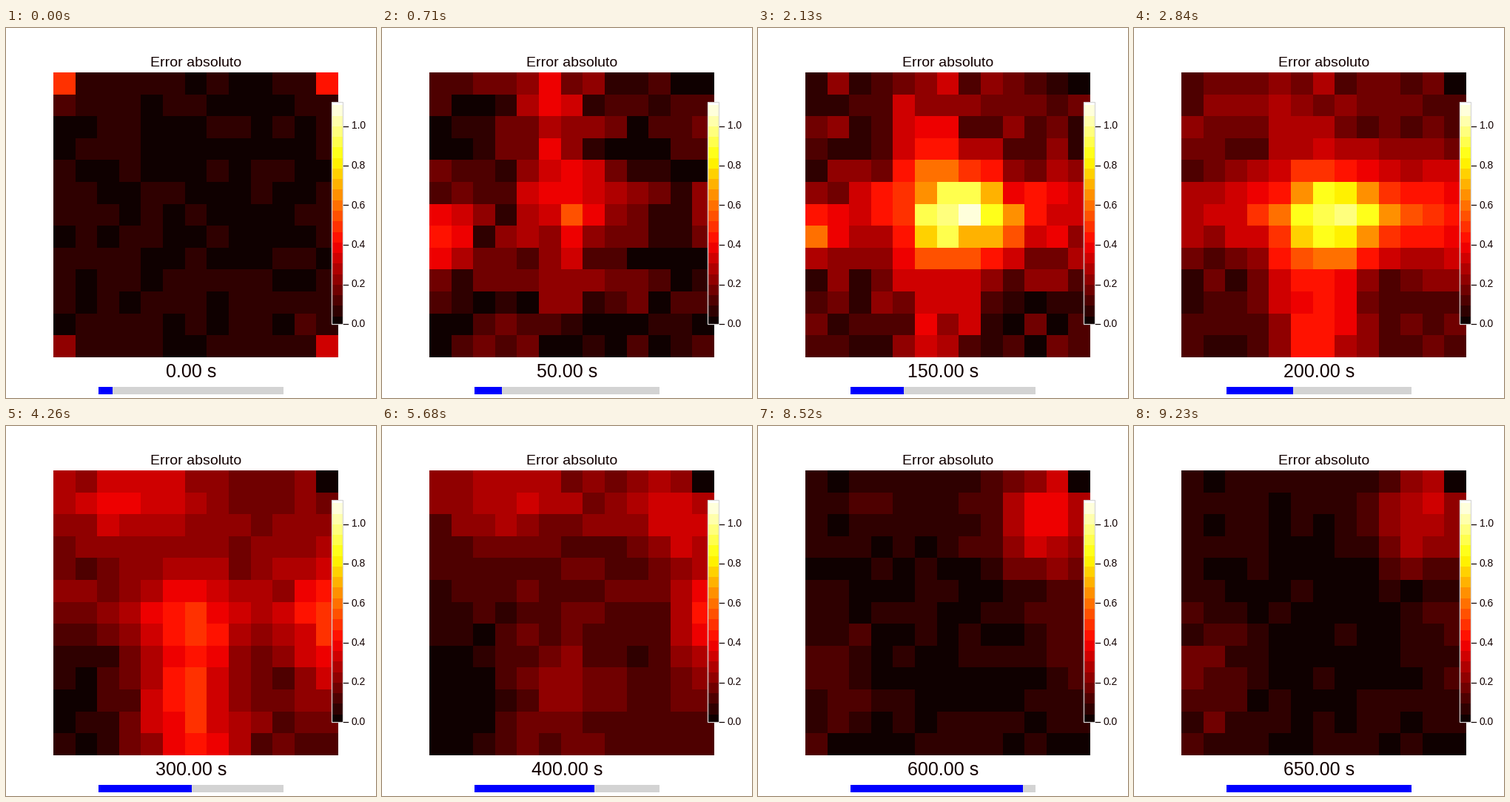
These frames come from a looping animation (500x500 px, 9940 ms). A matplotlib script:

```python
import numpy as np
import matplotlib.pyplot as plt
from matplotlib.animation import FuncAnimation
from matplotlib.colors import ListedColormap
from matplotlib.patches import Rectangle

plt.rcParams["font.family"] = "Liberation Sans"

N = 13            # cells per side
FRAMES = 14
DT = 50           # simulated seconds per frame
STEP = 0.0535     # width of one colour level
LEVELS = 22
TOP = 1.1215      # value at the top of the colour bar
INK = "#120000"

row, col = np.mgrid[:N, :N]
phase = np.random.default_rng(12).uniform(0, 2 * np.pi, (N, N))


def bell(x, mid, width):
    return np.exp(-((x - mid) / width) ** 2 / 2)


def bump(r, c, height, width):
    return height * bell(row, r, width[0]) * bell(col, c, width[1])


def field(t):
    """Absolute error: sources that swell and fade, over a drifting noise."""
    start = bell(t, 0, 0.3)
    heat = (
        bump(5.9, 6.9, 0.55, (1.5, 1.8)) * bell(t, 3, 1.5)       # core
        + bump(6.9, 0, 0.55, (1.2, 1.1)) * bell(t, 2, 1)         # west
        + bump(5.9, 6, 0.28, (1.2, 6)) * bell(t, 4, 1.5)         # band
        + bump(2, 5.2, 0.38, (4, 1.1)) * bell(t, 1.8, 1)         # upper column
        + bump(10, 5.7, 0.40, (3.5, 1.4)) * bell(t, 5, 1.8)      # lower column
        + bump(0.8, 3.2, 0.22, (1.4, 2.8)) * bell(t, 7, 2.5)     # north
        + bump(6.3, 12, 0.30, (2.2, 1.1)) * bell(t, 7, 3.2)      # east
        + bump(1.5, 10.5, 0.42, (1.6, 1.6)) * bell(t, 11, 2.7)   # north-east
        - bump(10, 0.7, 0.18, (2.6, 1.4)) * bell(t, 7.5, 1.8)    # cool corner
        + bump(9, 0.5, 0.14, (2, 1.5)) * bell(t, 13, 1.3)
    )
    base = 0.035 + 0.11 * bell(t, 5.5, 2.4)
    spread = 0.035 + 0.09 * bell(t, 2, 1)
    z = base + spread * np.sin(phase + 0.9 * t) + (1 - start) * heat
    for r, c, h in (0, 0, 0.38), (0, 12, 0.38), (12, 0, 0.2), (12, 12, 0.3):
        z += start * bump(r, c, h, (0.5, 0.5))
    z[0, -1] *= start
    return np.maximum(z, 0)


def level(v):
    return np.clip(np.floor((v - 0.037) / STEP) + 1, 0, LEVELS - 1)


centres = np.arange(LEVELS) * STEP + 0.0105
cmap = ListedColormap(plt.get_cmap("hot")(centres / TOP))

fig = plt.figure(figsize=(5, 5), dpi=100, facecolor="white")
ax = fig.add_axes([0, 0, 1, 1])


def show(z, extent, order):
    return ax.imshow(z, cmap=cmap, vmin=-0.5, vmax=LEVELS - 0.5, extent=extent,
                     aspect="auto", interpolation="nearest", zorder=order)


def box(x, y, w, h, **style):
    return ax.add_patch(Rectangle((x, y), w, h, **style))


grid = show(level(field(0)), (64, 449, 445, 60), 1)

# colour bar
ramp = np.linspace(TOP, 0, 300)[:, None]
show(level(ramp), (440, 455, 400, 100), 2)
box(440, 100, 15, 300, fill=False, ec="#d6d6d6", lw=0.9, zorder=3)
for v in np.arange(0, 1.1, 0.2):
    y = 400 - 267.5 * v
    ax.plot([456, 462], [y, y], color=INK, lw=0.9, zorder=3)
    ax.text(466.5, y + 4, f"{v:.1f}", fontsize=10, color=INK)

ax.text(256.5, 52, "Error absoluto", fontsize=14, ha="center", color=INK)
clock = ax.text(250, 472, "", fontsize=18, ha="center", color=INK)

box(125, 485, 250, 10, fc="#d3d3d3", lw=0, antialiased=False)
bar = box(125, 485, 0, 10, fc="#0000ff", lw=0, antialiased=False, zorder=2)

ax.set_xlim(0, 500)
ax.set_ylim(500, 0)
ax.axis("off")


def draw(i):
    grid.set_data(level(field(i)))
    clock.set_text(f"{i * DT:.2f} s")
    bar.set_width(min(250, round(250 * (i + 1) / FRAMES) + 1))
    return grid, clock, bar


anim = FuncAnimation(fig, draw, frames=FRAMES, interval=710, repeat=True,
                     repeat_delay=0)
plt.show()
```
